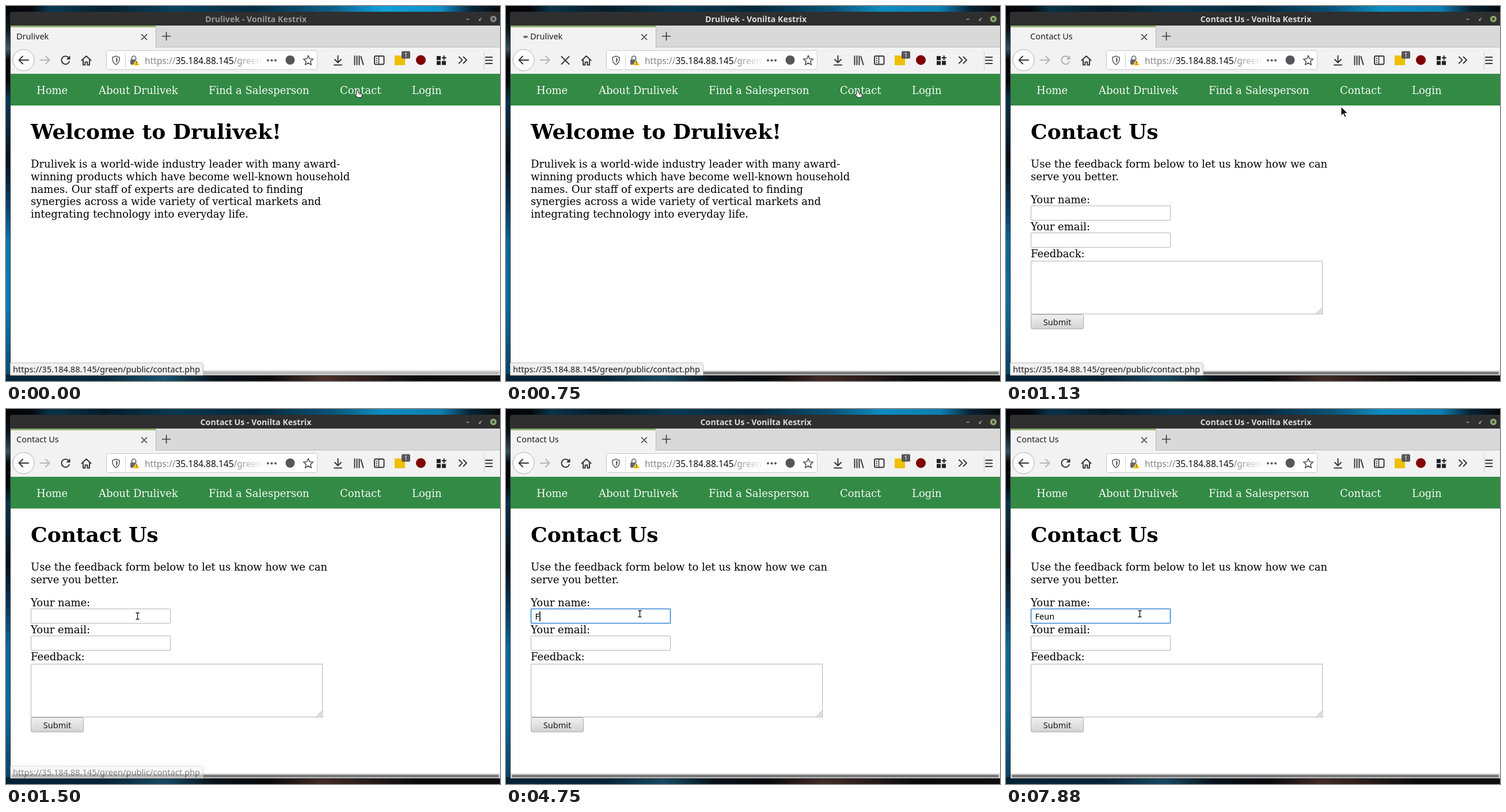
An HTML page that plays this animation: 858 px wide and 652 px high, repeating every 8 s.

```html
<!DOCTYPE html>
<html lang="en">
<head>
<meta charset="utf-8">
<title>Contact form</title>
<style>
html, body { margin: 0; width: 100%; height: 100%; overflow: hidden; background: #05080c; }
svg { display: block; width: 100vw; height: 100vh; }
text { white-space: pre; }
.ui { font: 14.5px "Noto Sans", "Open Sans", sans-serif; fill: #1c1c1c; }
.page { font: 18px "DejaVu Serif", serif; }
.heading { font: bold 36px "DejaVu Serif", serif; }
.line { fill: none; stroke: #38383d; stroke-width: 2; stroke-linecap: round; stroke-linejoin: round; }
.field { fill: #fff; stroke: #b4b4b4; }
</style>
</head>
<body>
<svg viewBox="0 0 858 652">
<defs>
  <linearGradient id="deskTop">
    <stop offset="0" stop-color="#030609"/><stop offset=".05" stop-color="#05080c"/>
    <stop offset=".09" stop-color="#0a3a54"/><stop offset=".2" stop-color="#06202f"/>
    <stop offset=".34" stop-color="#08425f"/><stop offset=".5" stop-color="#062c42"/>
    <stop offset=".66" stop-color="#0b5e88"/><stop offset=".76" stop-color="#10a0da"/>
    <stop offset=".88" stop-color="#0f8fc8"/><stop offset=".94" stop-color="#07283c"/>
    <stop offset="1" stop-color="#080a0e"/>
  </linearGradient>
  <linearGradient id="deskLeft" x2="0" y2="1">
    <stop offset="0" stop-color="#04070a"/><stop offset=".05" stop-color="#0a1820"/>
    <stop offset=".1" stop-color="#3c5a6c"/><stop offset=".13" stop-color="#05080b"/>
    <stop offset=".19" stop-color="#05090d"/><stop offset=".24" stop-color="#083a58"/>
    <stop offset=".4" stop-color="#05121c"/><stop offset=".52" stop-color="#06406a"/>
    <stop offset=".63" stop-color="#0c78b2"/><stop offset=".8" stop-color="#0c7ab6"/>
    <stop offset="1" stop-color="#06486e"/>
  </linearGradient>
  <linearGradient id="deskBottom">
    <stop offset="0" stop-color="#06283e"/><stop offset=".2" stop-color="#08283c"/>
    <stop offset=".32" stop-color="#1a5270"/><stop offset=".42" stop-color="#07141e"/>
    <stop offset=".53" stop-color="#090a0c"/><stop offset=".64" stop-color="#4a302a"/>
    <stop offset=".74" stop-color="#2c1e1c"/><stop offset=".84" stop-color="#0a0a0c"/>
    <stop offset="1" stop-color="#101012"/>
  </linearGradient>
  <linearGradient id="fade">
    <stop offset="0" stop-color="#fff" stop-opacity="0"/><stop offset="1" stop-color="#fff"/>
  </linearGradient>
  <linearGradient id="button" x2="0" y2="1">
    <stop offset="0" stop-color="#f1f1f1"/><stop offset="1" stop-color="#d2d2d2"/>
  </linearGradient>
  <clipPath id="tabClip"><path d="M8 36H260V71H8Z"/></clipPath>
</defs>

<!-- desktop -->
<rect width="858" height="652" fill="url(#deskTop)"/>
<rect y="10" width="10" height="642" fill="url(#deskLeft)"/>
<rect y="640" width="858" height="12" fill="url(#deskBottom)"/>
<rect id="shade" width="858" height="652"/>

<!-- title bar and window border -->
<path d="M7 643V14Q7 10 11 10H858V643Z" fill="#2f2f2f"/>
<text id="title" class="ui" x="434" y="28" text-anchor="middle" style="font-size:14.2px;font-weight:bold"></text>
<g fill="none" stroke="#a0a0a0" stroke-width="1.3">
  <path d="M799.5 23H804.5M822 25L826.5 20.5M822 22.5V25H824.5"/>
  <circle id="close" cx="846.5" cy="22.5" r="5.5" stroke="none"/>
  <path d="M844.3 20.3L848.7 24.7M848.7 20.3L844.3 24.7" stroke="#2f2f2f" stroke-width="1.5"/>
</g>

<!-- tabs -->
<path d="M8 34H858V72H8Z" fill="#d9d9d9"/>
<path d="M260 71.5H858" stroke="#b9b9b9"/>
<path d="M8 34H260V72H8Z" fill="#f2f2f2"/>
<path d="M260.5 36V72" stroke="#b4b4b4"/>
<g clip-path="url(#tabClip)"><circle id="burst" cx="31" cy="53" fill="#3c9ae8"/></g>
<path d="M8 35.5H260" stroke="#8fb06a" stroke-width="3"/>
<ellipse id="loader" cy="53.5" ry="2" fill="#666"/>
<text id="tabTitle" class="ui" y="58"></text>
<path class="line" style="stroke-width:1.6" d="M235.5 49.5L244.5 58.5M244.5 49.5L235.5 58.5M271.5 52.5H285.5M278.5 45.5V59.5"/>

<!-- toolbar -->
<path d="M8 72H858V118H8Z" fill="#f2f2f2"/>
<path d="M8 117.5H858" stroke="#dcdcdc"/>
<circle cx="30.5" cy="94" r="18.5" fill="#fcfcfc" stroke="#b0b0b0"/>
<path class="line" d="M39 94H22.5M29 87.5L22.5 94L29 100.5"/>
<path class="line" style="stroke:#b5b5b5" d="M59.5 94H75.5M69 87.5L75.5 94L69 100.5"/>
<g id="reload">
  <path class="line" d="M109 90A7 7 0 1 0 110 96.5"/>
  <path d="M111.5 86V93H104.5Z" fill="#38383d"/>
</g>
<path id="stop" class="line"/>
<path class="line" d="M131.5 94.5L139.5 87L147.5 94.5M134 94V102.5H137.5V97.5H141.5V102.5H145V94"/>
<rect x="174.5" y="77.5" width="366" height="33" rx="3" fill="#fff" stroke="#c9c9c9"/>
<g class="line" style="stroke:#66666a;stroke-width:1.7">
  <path d="M185 89Q189 88.5 191 87Q193 88.5 197 89V93Q196.500 99 191 102Q185.5 99 185 93Z"/>
  <path d="M191 90V99Q194 97 194 91.5Z" fill="#66666a" stroke="none"/>
  <path d="M218.5 94V90.5A3.5 3.5 0 0 1 225.5 90.5V94"/>
</g>
<path d="M207.5 82V107" stroke="#d0d0d0"/>
<rect x="216" y="93" width="11" height="9" rx="1.5" fill="#66666a"/>
<path d="M226.5 93.5L232.5 103.5H220.5Z" fill="#ffbf00" stroke="#fff" stroke-width=".8"/>
<path d="M226.5 96.5V99.5M226.5 101V102.3" stroke="#5a4500" stroke-width="1.3"/>
<text class="ui" x="241" y="100.5" style="font-size:15.5px;fill:#858585">https://<tspan fill="#111">35.184.88.145</tspan>/green</text>
<path d="M400 86H450V108H400Z" fill="url(#fade)"/>
<g fill="#55555a">
  <circle cx="455" cy="94.5" r="2"/><circle cx="461.5" cy="94.5" r="2"/><circle cx="468" cy="94.5" r="2"/>
  <circle cx="493.5" cy="94" r="8"/>
</g>
<path id="star" class="line" style="stroke:#55555a;stroke-width:1.6"/>
<path class="line" d="M576.5 86.5V98M571 93L576.5 98.5L582 93M570 102.5H583"/>
<path class="line" d="M605.5 87V102M609.5 87V102M613.5 87V102M616.5 88L620.5 102"/>
<rect class="line" x="640" y="87" width="16.5" height="14.5" rx="2"/>
<path class="line" style="stroke-width:1.5" d="M647.5 87V101.5M643 91H644.5M643 94.5H644.5M643 98H644.5"/>
<rect x="675" y="86" width="18" height="17" fill="#efbf04"/>
<rect x="687" y="78.5" width="15" height="13" rx="2" fill="#55555a"/>
<text class="ui" x="694.5" y="89" text-anchor="middle" style="font-size:10.5px;fill:#fff">1</text>
<circle cx="720.5" cy="94" r="8.5" fill="#800000"/>
<path d="M748 87H755V94H748ZM748 95.5H755V102.5H748ZM757 95.5H764V102.5H757ZM759.7 86H761.7V89H764.7V91H761.7V94H759.7V91H756.7V89H759.7Z" fill="#222226"/>
<path class="line" d="M787 88.5L792.5 94L787 99.5M794.5 88.5L800 94L794.5 99.5M833 89H844.5M833 94.5H844.5M833 100H844.5"/>
<path d="M830.5 79V110" stroke="#cfcfcf"/>

<!-- page -->
<path d="M8 173H858V635H8Z" fill="#fff"/>
<path d="M8 118H858V173H8Z" fill="#338a45"/>
<g id="menu" class="page" fill="#f6faf6"></g>
<text id="heading" class="heading" x="43" y="231"></text>
<g id="copy" class="page"></g>
<g id="form">
  <g class="page"><text x="43" y="343">Your name:</text><text x="43" y="390">Your email:</text><text x="43" y="437">Feedback:</text></g>
  <rect id="nameField" class="field" x="43.5" y="347.5" width="242" height="25" rx="1.5"/>
  <rect class="field" x="43.5" y="394.5" width="242" height="25" rx="1.5"/>
  <rect class="field" x="43.5" y="443.5" width="506" height="92"/>
  <path d="M539.5 534.5L548.5 525.5M543 534.5L548.5 529M546.5 534.5L548.5 532.5" stroke="#888"/>
  <rect x="43.5" y="536.5" width="91" height="25" rx="2" fill="url(#button)" stroke="#adadad"/>
  <text class="ui" x="89" y="555" text-anchor="middle">Submit</text>
  <text id="typed" class="ui" x="50.5" y="366" style="fill:#000"></text>
  <rect id="caret" y="352" width="1.6" height="17"/>
</g>

<!-- scrollbar and link preview -->
<path d="M8 634H858V642H8Z" fill="#d8d8d8"/>
<path d="M8 634.5H858" stroke="#c4c4c4"/>
<rect id="thumb" x="10" y="636" width="846" height="4.5" rx="2"/>
<g id="status">
  <path d="M7.5 642V620.5H338Q342.5 620.5 342.5 625V642Z" fill="#f0f0f0" stroke="#bdbdbd"/>
  <text class="ui" x="12" y="637" style="font-size:14.6px">https://35.184.88.145/green/public/contact.php</text>
</g>

<!-- pointers, each drawn around its own hot spot -->
<g id="hand" stroke="#111">
  <path d="M-4 -5Q-2.5 -6.5 -1 -5V-1L4 0Q6 .5 5.5 3L4.5 7H-2.5L-6 2.5Q-5.5 .5 -4 2Z" fill="#fff"/>
  <path d="M1 0V3M3 .5V3" stroke-width=".7"/>
</g>
<path id="arrow" d="M0 0V16L3.8 12.5L6.5 18.5L9 17.4L6.3 11.6H11.5Z" fill="#111" stroke="#fff"/>
<path id="beam" d="M-3 -5.5H-1L0 -4.5L1 -5.5H3M0 -4.5V4.5M-3 5.5H-1L0 4.5L1 5.5H3" fill="none" stroke="#111" stroke-width="1.3"/>
</svg>

<script>
const LOOP = 8000, COMPANY = "Drulivek", BROWSER = "Vonilta Kestrix", NAME = "Feun";
const $ = id => document.getElementById(id);
const set = (id, attrs) => { for (const key in attrs) $(id).setAttribute(key, attrs[key]); };
const show = (id, on) => $(id).style.display = on ? "" : "none";

function addText(parent, x, y, content) {
  const node = document.createElementNS($("menu").namespaceURI, "text");
  node.setAttribute("x", x);
  node.setAttribute("y", y);
  node.textContent = content;
  $(parent).append(node);
}

[[53, "Home"], [161, "About " + COMPANY], [352, "Find a Salesperson"], [580, "Contact"], [705, "Login"]]
  .forEach(([x, label]) => addText("menu", x, 153, label));

const starPoints = Array.from({ length: 10 }, (_, i) => {
  const angle = i * Math.PI / 5, radius = i % 2 ? 4 : 9;
  return [525 + radius * Math.sin(angle), 95 - radius * Math.cos(angle)];
});
set("star", { d: "M" + starPoints.join("L") + "Z" });

const pages = {
  welcome: {
    title: COMPANY, heading: `Welcome to ${COMPANY}!`,
    copy: [`${COMPANY} is a world-wide industry leader with many award-`,
      "winning products which have become well-known household",
      "names. Our staff of experts are dedicated to finding",
      "synergies across a wide variety of vertical markets and",
      "integrating technology into everyday life."]
  },
  contact: {
    title: "Contact Us", heading: "Contact Us",
    copy: ["Use the feedback form below to let us know how we can", "serve you better."]
  }
};

// Each track lists [start ms, ...values]; values hold until the next entry.
const tracks = {
  tabX: [[0, 18], [500, 34], [630, 42], [1250, 38], [1380, 26], [1500, 18]],
  loader: [[0, 0, 0], [630, 31.5, 3], [750, 34, 4], [880, 0, 0]],
  stop: [[0, ""], [630, "M96 88L109 101"], [750, "M96.5 88L109.5 101M109.5 88L96.5 101"], [880, ""]],
  reload: [[0, 1], [630, 0], [880, .35], [1500, 1]],
  burst: [[0, 0, 0], [880, 76, .36], [1000, 190, .14], [1130, 0, 0]],
  status: [[0, 1], [880, 0], [1000, 1], [1380, .9], [1500, .5], [1630, 0]],
  pointer: [[0, "hand", 613, 152], [1130, "arrow", 582, 175], [1250, "arrow", 430, 248],
    [1380, "arrow", 280, 328], [1500, "beam", 228.5, 360], [1880, "beam", 227, 361.5],
    [2130, "beam", 229, 360], [2250, "beam", 231, 358], [2380, "beam", 232.5, 356]],
  letters: [[0, 0], [4750, 1], [5500, 2], [6130, 3], [7130, 4]],
  caret: [[0, 0], [1750, 1], [3880, 0], [4250, 1], [5380, 0], [5500, 1], [6750, 0], [7130, 1], [7880, 0]]
};
const at = (name, t) => tracks[name].findLast(([start]) => start <= t).slice(1);

let currentPage;
function showPage(page) {
  if (page === currentPage) return;
  currentPage = page;
  $("title").textContent = `${page.title} - ${BROWSER}`;
  $("tabTitle").textContent = page.title;
  $("heading").textContent = page.heading;
  $("copy").replaceChildren();
  page.copy.forEach((line, i) => addText("copy", 43, 281 + 21.8 * i, line));
  show("form", page === pages.contact);
}

function draw(t) {
  const focused = t >= 380, editing = t >= 1750;
  showPage(t < 880 ? pages.welcome : pages.contact);

  $("title").style.fill = focused ? "#dcdcdc" : "#9a9a9a";
  set("close", { fill: focused ? "#92b372" : "#8a8a8a" });
  set("thumb", { fill: focused ? "#777" : "#b9b9b9" });
  set("shade", { opacity: focused ? .12 : 0 });

  const [loaderX, loaderRadius] = at("loader", t);
  const [burstRadius, burstOpacity] = at("burst", t);
  set("tabTitle", { x: at("tabX", t)[0] });
  set("loader", { cx: loaderX, rx: loaderRadius });
  set("burst", { r: burstRadius, opacity: burstOpacity });
  set("stop", { d: at("stop", t)[0] });
  set("reload", { opacity: at("reload", t)[0] });
  set("status", { opacity: at("status", t)[0] });

  set("nameField", { style: editing ? "stroke:#3584d4;stroke-width:1.6" : "" });
  const letters = at("letters", t)[0];
  $("typed").textContent = NAME.slice(0, letters);
  const caretX = letters ? 50.5 + $("typed").getComputedTextLength() : 51;
  set("caret", { x: caretX, opacity: at("caret", t)[0] });

  const [shape, x, y] = at("pointer", t);
  for (const id of ["hand", "arrow", "beam"]) show(id, id === shape);
  set(shape, { transform: `translate(${x} ${y})` });
}

function tick() {
  draw(performance.now() % LOOP);
  requestAnimationFrame(tick);
}
tick();
</script>
</body>
</html>
```
